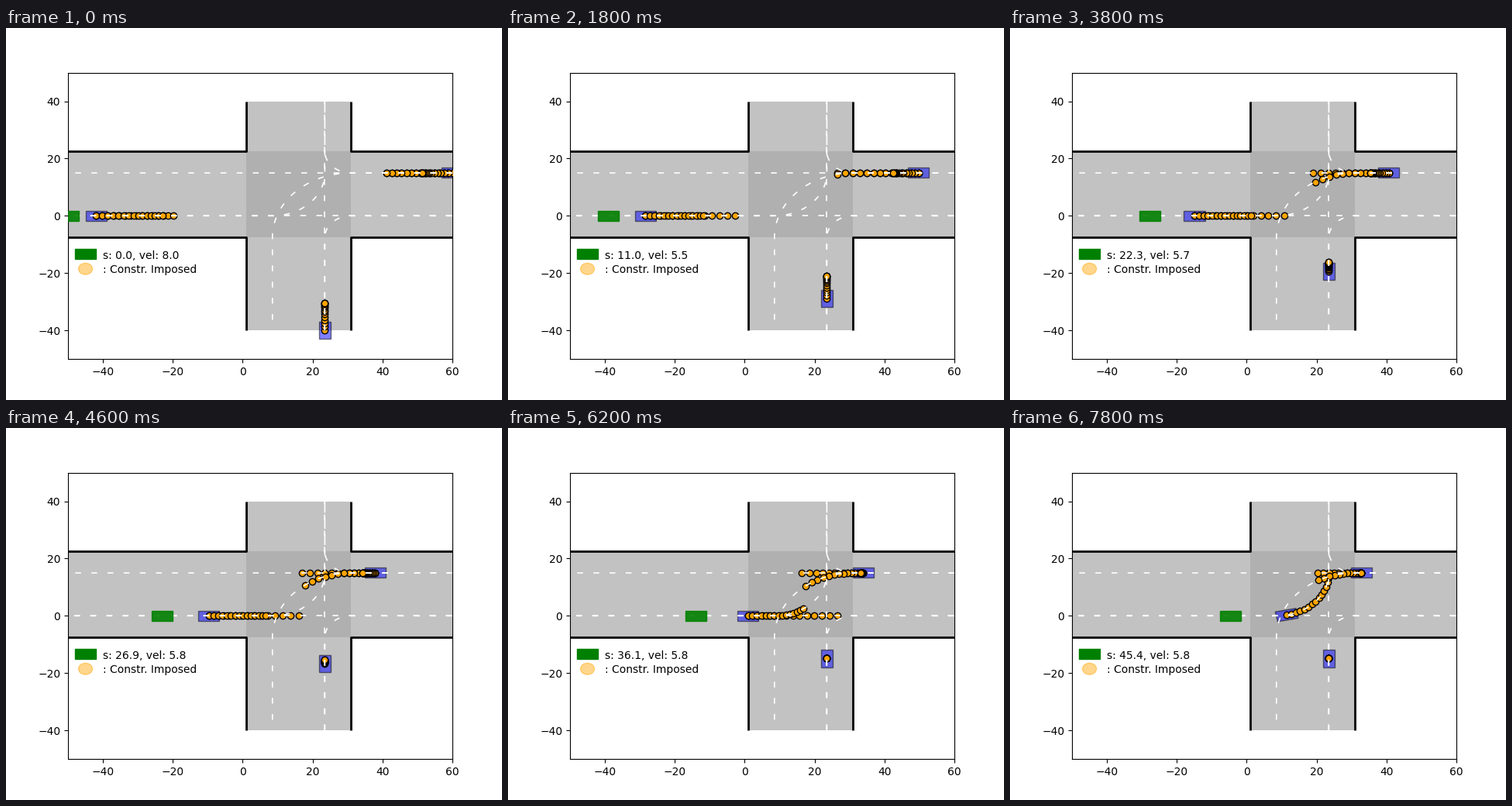
Write a matplotlib script that moves like this. It is 640 by 480 pixels and loops after 8000 ms.

```python
import numpy as np
import matplotlib.pyplot as plt
from matplotlib.animation import FuncAnimation
from matplotlib.patches import Circle, Rectangle
from matplotlib.transforms import Affine2D

FRAMES, STEP = 40, 0.2          # number of pictures, seconds per picture
DOTS, HORIZON = 15, 2.8         # predicted dots and the seconds they span
COMMIT = 7.0                    # when the first car has chosen to turn
CAR = (6, 3.5)
ROAD, CROSSING, GREEN = "#c2c2c2", "#b0b0b0", "#008000"


def arc(cx, cy, r, start, end):
    a = np.radians(np.linspace(start, end, 40))
    return list(zip(cx + r * np.cos(a), cy + r * np.sin(a)))


class Path:
    def __init__(self, *points):
        self.xy = np.array(points, float)
        gaps = np.hypot(*np.diff(self.xy, axis=0).T)
        self.dist = np.concatenate([[0], np.cumsum(gaps)])

    def at(self, s):
        return (np.interp(s, self.dist, self.xy[:, 0]),
                np.interp(s, self.dist, self.xy[:, 1]))

    def heading(self, s):
        x, y = self.at(np.array([s, s + 0.1]))
        return np.arctan2(y[1] - y[0], x[1] - x[0])


west = Path((-50, 0), (60, 0))
west_left = Path((-50, 0), *arc(8.5, 15, 15, -90, 0), (23.5, 40))
east = Path((60, 15), (-50, 15))
east_left = Path((60, 15), *arc(31, -7.5, 22.5, 90, 180), (8.5, -40))
east_right = Path((60, 15), *arc(31, 22.5, 7.5, 270, 180), (23.5, 40))
south = Path((23.5, -40), (23.5, 40))
south_right = Path((23.5, -40), *arc(31, -7.5, 7.5, 180, 90), (60, 0))


# Motions: time -> distance driven, speed, distance left before a stop
def ego_motion(t, cruise=5.826, extra=2.174, tau=0.885):
    fade = extra * np.exp(-t / tau)
    return cruise * t + fade * t, cruise + fade * (1 - t / tau)


def cruising(t, start=8, cruise=6.6, lead=2):
    fade = lead * np.exp(-t)
    return start + cruise * t + lead - fade, cruise + fade, np.inf


def braking(total, duration, power):
    def motion(t):
        rest = max(1 - t / duration, 0)
        left = total * rest**power
        return total - left, total * power / duration * rest**(power - 1), left
    return motion


# Manoeuvres: how far the predicted dots reach
def fast(t, speed, left):
    end = min(speed + 9, 11.7 - 4.5 * np.exp(-t / 0.7))
    return HORIZON * (speed + end) / 2


def slow(t, speed, left):
    return HORIZON * (speed + (5 if t < COMMIT else 8)) / 2


def stop(t, speed, left):
    return min(HORIZON * speed / 2, 0.7 * left)


fig = plt.figure(figsize=(6.4, 4.8), dpi=100)
ax = fig.add_subplot()
ax.set_xlim(-50, 60)
ax.set_ylim(-50, 50)

# Roads and kerbs
for x, y, w, h, color in [(1, -40, 30, 80, ROAD), (-50, -7.5, 110, 30, ROAD),
                          (1, -7.5, 30, 30, CROSSING)]:
    ax.add_patch(Rectangle((x, y), w, h, fc=color, ec="none", zorder=0))
for x, far_x in [(1, -50), (31, 60)]:
    for y, far_y in [(22.5, 40), (-7.5, -40)]:
        ax.plot([far_x, x, x], [y, y, far_y], color="black", lw=2,
                solid_capstyle="butt", zorder=1)

# Lane dashes; those from the west begin a little way in
for path in (west, west_left, east, east_left, east_right, south, south_right):
    shift = 7.7 if path in (west, west_left) else 0
    ax.plot(*path.xy.T, color="white", lw=1.2, zorder=6,
            dash_capstyle="butt", linestyle=(shift, (4.5, 8)))


def add_car(**style):
    return ax.add_patch(Rectangle((-CAR[0] / 2, -CAR[1] / 2), *CAR, **style))


def place(car, x, y, angle=0):
    car.set_transform(Affine2D().rotate(angle).translate(x, y) + ax.transData)


class Vehicle:
    """A car with one row of predicted dots for every manoeuvre."""

    def __init__(self, path, motion, *branches):
        self.path, self.motion = path, motion
        self.patch = add_car(fc="blue", ec="black", alpha=0.5, zorder=3)
        self.branches = [
            (route, reach, ax.plot([], [], "o", color="orange", mec="black",
                                   ms=6, mew=1, zorder=4)[0])
            for route, reach in branches]

    def update(self, t):
        s, speed, left = self.motion(t)
        place(self.patch, *self.path.at(s), self.path.heading(s))
        k = np.linspace(0, 1, DOTS)
        for route, reach, dots in self.branches:
            length = max(reach(t, speed, left), 0.05)
            r = min(HORIZON * speed / length, 2)
            dots.set_data(*route.at(s + length * (r * k + (1 - r) * k**2)))
            dots.set_visible(route is not west or t < COMMIT)


vehicles = [
    Vehicle(west_left, cruising, (west, fast), (west_left, slow)),
    Vehicle(east, braking(27.2, 7.2, 1.65),
            (east, fast), (east_left, fast), (east, stop)),
    Vehicle(south, braking(25.1, 5.6, 1.53), (south, stop)),
]

ego = add_car(fc=GREEN, ec=GREEN, alpha=0.9, zorder=7)
place(add_car(fc=GREEN, ec=GREEN, zorder=3), -45, -13.25)
ax.add_patch(Circle((-45, -18.5), 2, color="orange", alpha=0.45, zorder=3))
label = ax.text(-40, -15, "")
ax.text(-40, -20, ": Constr. Imposed")


def update(i):
    t = i * STEP
    for vehicle in vehicles:
        vehicle.update(t)
    s, speed = ego_motion(t)
    place(ego, s - 50, 0)
    label.set_text(f"s: {s:.1f}, vel: {speed:.1f}")
    return []


anim = FuncAnimation(fig, update, frames=FRAMES, init_func=lambda: update(0),
                     interval=STEP * 1000, repeat=True, repeat_delay=0)
plt.show()
```
